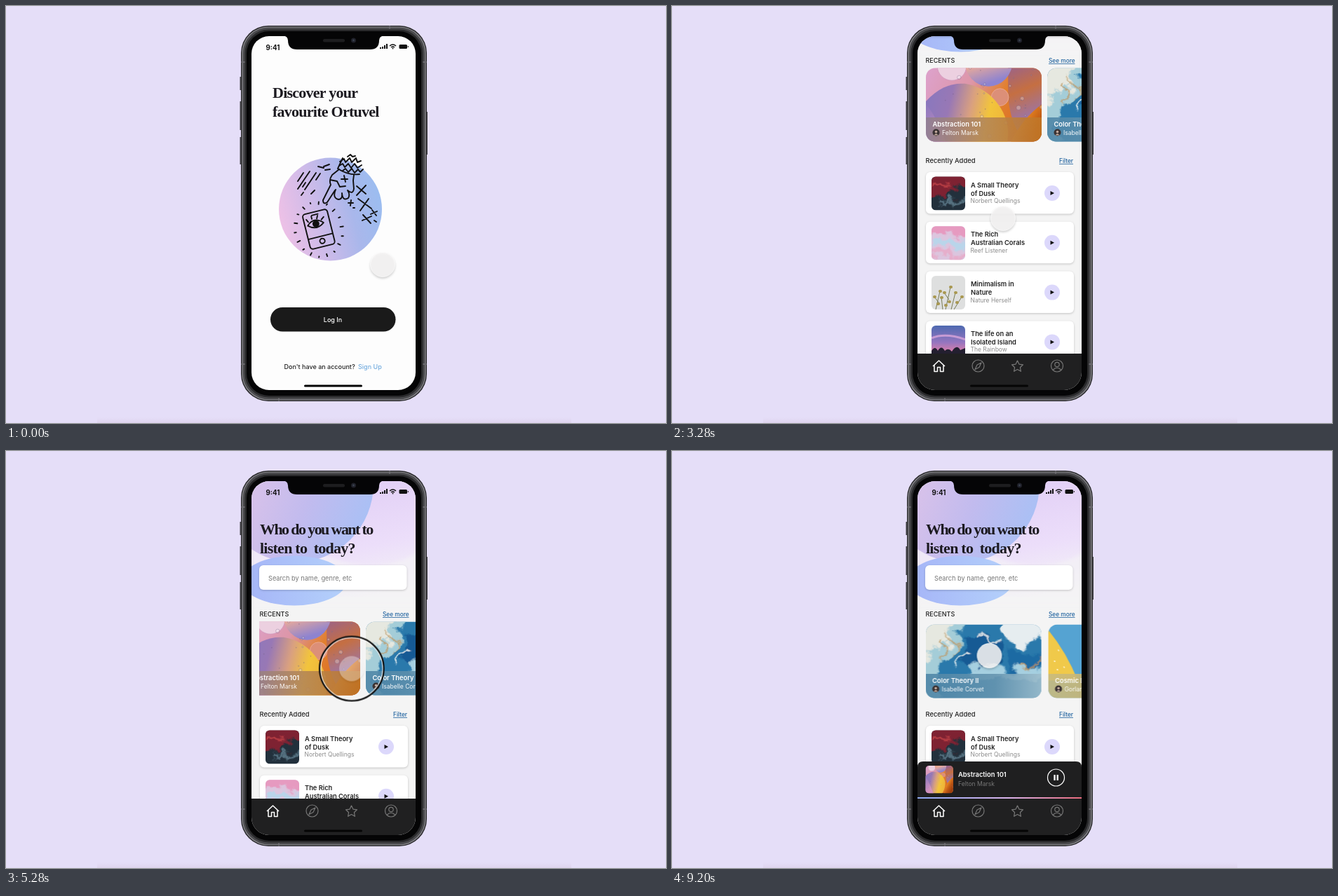
Write an HTML page that moves like this. It is 941 px wide and 595 px high and loops after 9.28 s.

```html
<!DOCTYPE html>
<html lang="en">
<head>
<meta charset="utf-8">
<title>Audio app preview</title>
<style>
html, body { margin: 0; width: 100%; height: 100%; overflow: hidden; background: #e5def8; }
svg.stage { display: block; width: 100vw; height: 100vh; }
text { font-family: Inter, sans-serif; font-size: 9px; font-weight: 500; fill: #222; }
.head { font: bold 22px "Liberation Serif", serif; letter-spacing: -.75px; fill: #1c1a20; white-space: pre; }
.tight { letter-spacing: -1.6px; }
.bold { font-weight: 600; font-size: 9.3px; }
.dim { font-weight: 400; font-size: 8.5px; fill: #8c8c8c; }
.link { font-size: 8.3px; fill: #20639f; }
.tiny { font-size: 7px; }
.white { fill: #fff; }
.line { fill: none; stroke: #111; stroke-width: 1.9; stroke-linecap: round; stroke-linejoin: round; }
.icon { fill: none; stroke: #777; stroke-width: 1.2; stroke-linejoin: round; }
.lift { filter: drop-shadow(0 1px 1.5px #0003); }

.move { animation: 9.28s ease-in-out infinite both; }
#home { animation-name: home; }
#player { animation-name: player; }
#scroll { animation-name: scroll; }
#cards { animation-name: cards; }
.late { animation-name: late; animation-timing-function: step-end; }
#shift { animation-name: shift; animation-timing-function: step-end; }
#cursor { animation-name: cursor; }
#disc { animation-name: disc; animation-timing-function: linear; }
#ring { animation-name: ring; animation-timing-function: ease-out; }

@keyframes home { 0%, 6.9% { opacity: 0 } 10.34%, 100% { opacity: 1 } }
@keyframes player { 0%, 64.66% { opacity: 0 } 68.1%, 81.9% { opacity: 1 } 84.48%, 100% { opacity: 0 } }
@keyframes late { 0% { opacity: 0 } 73.28%, 100% { opacity: 1 } }
@keyframes shift { 0% { transform: none } 73.28%, 100% { transform: translateY(4px) } }
@keyframes scroll {
  0%, 22.41% { transform: translateY(0) }
  27.59%, 37.07% { transform: translateY(-155px) }
  42.24%, 100% { transform: translateY(0) }
}
@keyframes cards {
  0%, 45.69% { transform: translateX(0); animation-timing-function: ease-in }
  49.138% { transform: translateX(-100px); animation-timing-function: ease-out }
  51.72%, 54.31% { transform: translateX(-173px) }
  56.897% { transform: translateX(-22.5px); animation-timing-function: ease-out }
  57.76%, 88.79% { transform: translateX(0) }
  93.1%, 100% { transform: translateX(-173.5px) }
}
@keyframes cursor {
  0%, .86% { transform: translate(537px, 369px) }
  4.31%, 22.41% { transform: translate(478px, 448px) }
  27.59%, 37.07% { transform: translate(472px, 303px) }
  42.24% { transform: translate(474px, 440px) }
  45.69% { transform: translate(535px, 305px); animation-timing-function: ease-in }
  49.138% { transform: translate(435px, 307px); animation-timing-function: ease-out }
  51.72%, 54.31% { transform: translate(385px, 308px) }
  56.897% { transform: translate(492.5px, 310.5px); animation-timing-function: ease-out }
  57.76% { transform: translate(508px, 311px) }
  62.07%, 73.28% { transform: translate(435.5px, 308px) }
  79.31%, 82% { transform: translate(371px, 95px) }
  87.93%, 88.79% { transform: translate(535px, 296px) }
  93.1%, 100% { transform: translate(452.5px, 292px) }
}
@keyframes ring {
  0%, 4.31%, 7.76%, 22%, 28.4%, 36.7%, 43.1%, 44.83%, 58.6%, 62.07%, 65.5%, 79.31%, 82.7%, 88.4%, 94%, 100% { opacity: 0; transform: scale(.4) }
  5.17%, 6.9%, 22.8%, 27.59%, 37.5%, 42.24%, 45.69%, 57.76%, 62.93%, 64.66%, 80.17%, 81.9%, 89.2%, 93.1% { opacity: 1; transform: scale(1) }
}
@keyframes disc {
  0%, 4.31%, 7.76%, 22%, 28.4%, 36.7%, 43.1%, 44.83%, 58.6%, 62.07%, 65.5%, 79.31%, 82.7%, 88.4%, 94%, 100% { opacity: 1 }
  5.17%, 6.9%, 22.8%, 27.59%, 37.5%, 42.24%, 45.69%, 57.76%, 62.93%, 64.66%, 80.17%, 81.9%, 89.2%, 93.1% { opacity: .42 }
}
</style>
</head>
<body>
<svg class="stage" viewBox="0 0 941 595">
<defs>
  <linearGradient id="floor" x2="0" y2="1"><stop stop-color="#e5def8"/><stop offset="1" stop-color="#dcd0e9"/></linearGradient>
  <linearGradient id="orb" x1="0" y1=".65" x2="1" y2=".4"><stop stop-color="#efc1e6"/><stop offset=".35" stop-color="#cfbbe9"/><stop offset=".7" stop-color="#a9b7eb"/><stop offset="1" stop-color="#9bbdf0"/></linearGradient>
  <linearGradient id="sky" x1=".4" y1="0" x2=".7" y2="1"><stop stop-color="#e0cdf5"/><stop offset=".6" stop-color="#ecdefa"/><stop offset="1" stop-color="#f4f3f5"/></linearGradient>
  <linearGradient id="moon" x1=".3" y1=".4" x2="1" y2=".65"><stop stop-color="#d6c1ea"/><stop offset=".45" stop-color="#c2bbee"/><stop offset="1" stop-color="#a9c0f5"/></linearGradient>
  <linearGradient id="pool"><stop stop-color="#a5b4f7"/><stop offset="1" stop-color="#b4d1fb"/></linearGradient>
  <linearGradient id="base" x2="1" y2=".5"><stop stop-color="#dda3d0"/><stop offset=".4" stop-color="#dd96a8"/><stop offset=".65" stop-color="#e18030"/><stop offset="1" stop-color="#d9661c"/></linearGradient>
  <linearGradient id="drop" x1="0" y1=".35" x2="1" y2=".6"><stop stop-color="#8b78bd"/><stop offset=".25" stop-color="#9878b5"/><stop offset=".5" stop-color="#d9a080"/><stop offset=".72" stop-color="#f2c43c"/><stop offset="1" stop-color="#eeb238"/></linearGradient>
  <linearGradient id="glow" x2=".4" y2="1"><stop stop-color="#d99bd0" stop-opacity="0"/><stop offset="1" stop-color="#d793bd"/></linearGradient>
  <linearGradient id="bubble" x2=".3" y2="1"><stop stop-color="#e08a3a"/><stop offset=".6" stop-color="#e5a89c"/><stop offset="1" stop-color="#8d83d0"/></linearGradient>
  <linearGradient id="wedge" x2=".2" y2="1"><stop stop-color="#8f5f9c"/><stop offset=".5" stop-color="#c56f42"/><stop offset="1" stop-color="#9276bd"/></linearGradient>
  <linearGradient id="ember" x1="0" y1="0" x2=".8" y2=".8"><stop stop-color="#f3a52c"/><stop offset=".45" stop-color="#ea8a22"/><stop offset=".75" stop-color="#bd5614"/><stop offset="1" stop-color="#9c3f0e"/></linearGradient>
  <linearGradient id="warm"><stop stop-color="#917f93"/><stop offset=".5" stop-color="#b48757"/><stop offset="1" stop-color="#c27624"/></linearGradient>
  <linearGradient id="cool"><stop stop-color="#4f86a7"/><stop offset=".6" stop-color="#6695b0"/><stop offset="1" stop-color="#a0bfcd"/></linearGradient>
  <linearGradient id="sand"><stop stop-color="#c8bb80"/><stop offset="1" stop-color="#cfae5e"/></linearGradient>
  <linearGradient id="progress"><stop stop-color="#8ea9f5"/><stop offset=".55" stop-color="#d9b4ec"/><stop offset="1" stop-color="#e86a7c"/></linearGradient>
  <linearGradient id="dusk" x2="0" y2="1"><stop stop-color="#4d69b0"/><stop offset=".5" stop-color="#9575bf"/><stop offset=".8" stop-color="#e07fa8"/></linearGradient>
  <filter id="soft"><feGaussianBlur stdDeviation="2.5"/></filter>
  <filter id="marble" x="-.2" y="-.2" width="1.4" height="1.4">
    <feTurbulence type="fractalNoise" baseFrequency=".045" numOctaves="4" seed="5" result="noise"/>
    <feGaussianBlur in="SourceGraphic" stdDeviation=".8"/>
    <feDisplacementMap in2="noise" scale="34" xChannelSelector="R" yChannelSelector="G"/>
  </filter>
  <clipPath id="screen"><rect x="350" y="43" width="234" height="505" rx="25"/></clipPath>
  <clipPath id="lane"><rect x="361.5" y="240" width="230" height="120"/></clipPath>
  <clipPath id="cardClip"><rect width="165" height="105" rx="13"/></clipPath>
  <clipPath id="artClip"><rect width="214" height="212" rx="12"/></clipPath>
  <clipPath id="thumbClip"><rect width="48" height="48" rx="6"/></clipPath>

  <g id="bubbles">
    <rect width="214" height="212" fill="url(#base)"/>
    <path d="M152 0H214V90L170 135Q155 110 152 70Z" fill="url(#wedge)"/>
    <circle cx="48" cy="14" r="27" fill="#ecd0e0" stroke="#cf92bb"/>
    <ellipse cx="116" cy="6" rx="44" ry="46" fill="url(#bubble)"/>
    <circle cx="137" cy="72" r="16" fill="#dc8f78" stroke="#eeb09a"/>
    <path d="M-2 82C22 54 48 45 72 47C118 53 153 98 152 140C151 172 138 197 128 214H-2Z" fill="url(#drop)"/>
    <path d="M-2 82C30 120 40 170 62 214H-2Z" fill="url(#glow)"/>
    <path d="M216 84C178 110 146 160 140 214H216Z" fill="url(#ember)"/>
    <g id="drops" fill="#fff4" stroke="#5a4a7288" stroke-width=".7"/>
  </g>
  <g id="ocean">
    <rect width="165" height="105" fill="#2a79ab"/>
    <g filter="url(#marble)">
      <path d="M-20-20H66Q44 18 46 36Q24 50 14 72V110H-20Z" fill="#a4cdd8"/>
      <path d="M-20-20H52Q36 14 34 26Q14 30 6 46H-20Z" fill="#e6e8e0"/>
      <path d="M54 22Q80 6 106 24Q118 48 92 66Q60 72 54 48Z" fill="#125a94"/>
      <path d="M104-20H190V24Q148 14 132 32Q112 22 104-20Z" fill="#e6edf0"/>
      <path d="M66 62Q86 50 104 60T150 56L170 76H60Z" fill="#a5cfe0"/>
      <path d="M118 38Q140 36 170 52V62H122Z" fill="#1f6ba3"/>
      <path d="M30 14Q46 22 40 40M140 66L164 50M20 20L26 50" fill="none" stroke="#bd9650" stroke-width="2.5"/>
      <path d="M78 16Q90 24 104 20M46 56L62 44" fill="none" stroke="#e6eef0" stroke-width="3"/>
    </g>
  </g>
  <g id="canary">
    <rect width="165" height="105" fill="#55a3d2"/>
    <path d="M0 8Q26 40 42 80H0Z" fill="#f0c94a"/>
    <path d="M14 36l1 2M8 52l2 1M22 60l1 2M12 64l2 1" stroke="#fff8d8" stroke-width="1.6"/>
  </g>
  <g id="lava">
    <rect width="48" height="48" fill="#22303c"/>
    <g filter="url(#marble)"><path d="M-16-16H64V20Q34 8 24 24T-16 28Z" fill="#7e2430"/><path d="M4 10Q20 2 30 14" stroke="#b83c44" stroke-width="4" fill="none"/><path d="M10 44Q28 24 46 34" stroke="#587584" stroke-width="4" fill="none"/></g>
  </g>
  <g id="coral">
    <rect width="48" height="48" fill="#dcc5de"/>
    <g filter="url(#marble)"><path d="M-10 10Q20 0 36 12T60 6V-16H-10Z" fill="#e69ac0"/><path d="M4 30Q22 14 44 28" stroke="#b9d5ea" stroke-width="11" fill="none"/><path d="M0 44Q22 32 48 46" stroke="#e6aecb" stroke-width="7" fill="none"/></g>
  </g>
  <g id="meadow">
    <rect width="48" height="48" fill="#dedfdf"/>
    <path d="M6 48L12 22M16 48L14 30M20 48L27 16M28 48L34 24M32 48L43 30M12 40L4 30M25 34L18 24" stroke="#777b55" fill="none"/>
    <path d="M12 22h1M4 30h1M27 16h1M18 24h1M34 24h1M43 30h1M14 31h1M25 37h1M36 38h1M9 40h1M20 42h1" stroke="#a99850" stroke-width="4" stroke-linecap="round"/>
  </g>
  <g id="island">
    <rect width="48" height="48" fill="url(#dusk)"/><path d="M0 18Q20 10 48 20" stroke="#c79bd4" stroke-width="3" fill="none"/>
    <path d="M0 48V36Q5 28 9 36Q14 27 19 36Q24 31 29 37Q36 26 41 35L48 32V48Z" fill="#231f30"/>
  </g>
  <g id="face"><circle r="5" fill="#3b3334"/><circle cy="-1" r="1.8" fill="#c0a79a"/><path d="M-3 4Q0-1 3 4Z" fill="#c0a79a"/></g>
  <path id="star" d="M0-8l2.4 5.1 5.6.7-4.1 3.9 1 5.6-4.9-2.8-4.9 2.8 1-5.6L-8-2.2l5.6-.7z"/>
  <g id="status">
    <text x="370.5" y="62.5" style="font-size:9.7px;font-weight:700;fill:#111">9:41</text>
    <path d="M534 61v-2M537 61v-3M540 61v-5M543 61v-7" stroke="#111" stroke-width="2"/>
    <path d="M547 57Q551.5 53 556 57M549 59Q551.5 57 554 59" fill="none" stroke="#111" stroke-width="1.5"/><circle cx="551.5" cy="60.5" r="1" fill="#111"/>
    <rect x="560.5" y="55" width="11.5" height="6" rx="1.5" fill="#111"/><path d="M573.3 57v2" stroke="#111"/>
  </g>
  <rect id="bar" x="425" y="540.5" width="83" height="3" rx="1.5" fill="#050505"/>
</defs>

<rect width="941" height="595" fill="#e5def8"/>
<rect x="130" y="587" width="676" height="8" fill="url(#floor)" opacity=".7"/>

<path d="M334.5 101v19M334.5 136v41M334.5 187v39M600 151v61" stroke="#434247" stroke-width="2"/>
<rect x="335" y="28" width="265" height="536" rx="39" fill="#29292b"/>
<rect x="338.5" y="31.500" width="258" height="529" rx="36" fill="none" stroke="#4a4a4d" stroke-width="4"/>
<rect x="337" y="30" width="261" height="532" rx="37.500" fill="none" stroke="#8a898e" stroke-width="1.200"/>
<path d="M335.500 80h5M594.500 80h5M335.500 511h5M594.500 511h5M547 28.500v4M389 559.500v4" stroke="#6c6b70" stroke-width="2"/>
<rect x="343" y="36" width="249" height="520" rx="32" fill="#050506"/>

<g clip-path="url(#screen)">
  <g class="login">
    <rect x="350" y="43" width="234" height="505" fill="#fdfdfd"/>
    <use href="#status"/>
    <text class="head" x="380" y="131">Discover your</text><text class="head" x="380" y="158">favourite Ortuvel</text>
    <circle cx="462.5" cy="290" r="73.5" fill="url(#orb)"/>
    <g class="line">
      <path d="M480 217L473 232Q488 242 504 240M476 222l6-4 2 5 6-6 3 6 6-6 2 6 5-2M475 228l5-3 3 5 5-5 4 6 5-6 4 6 6-4M487 215l4-3 3 3 4-1M480 235l4-3 4 5 5-5 4 6 5-5 3 4 4-4"/>
      <path d="M475 233L465 241Q460 248 463 255L452 277Q452 284 458 280L469 263M496 241l-1 8 1 12M462 248l10 2 4 8 8-1M470 262Q465 274 474 276Q480 276 479 267Q480 279 488 274Q491 269 487 263Q495 270 496 260M478 247h9M482 242l2 9"/>
      <path d="M433 236l-17 25M442 238l-16 24M424 238l-8 12M448 239l-6 9M445 229l8 2M453 229l8-3M455 234l7-1M424 266l-3 4M440 263l-5 5M427 252l-4 6"/>
      <path d="M500 257l13 11M513 256l-13 14M502 275l19 14M517 275l-12 17M509 298l11 12M521 300l-13 6M522 291l6 8M529 293l-9 4M488 281h7M492 277l-1 8M525 306l3 2M495 288h2"/>
      <g transform="translate(446 319) rotate(-14)">
        <rect x="-18" y="-26" width="36" height="51" rx="4"/><path d="M-17 10H17M-5-22H4M-14-9Q-3-20 9-8Q-3 1-14-9M-12-14l-2-4M-6-17v-4M1-16l2-4M7-13l4-3"/>
        <circle cx="-2" cy="-9" r="4" fill="#111"/><circle cx="1" cy="17" r="3.6"/><g id="rays"/>
      </g>
    </g>
    <rect x="377" y="430" width="178.5" height="34.5" rx="17.2" fill="#1a1a1a"/>
    <text class="white" x="466" y="450.5" text-anchor="middle">Log In</text>
    <text x="396.5" y="518">Don't have an account?</text><text x="502" y="518" style="fill:#73acdf">Sign Up</text>
    <use href="#bar"/>
  </g>

  <g id="home" class="move">
    <rect x="350" y="43" width="234" height="505" fill="#f4f4f4"/>
    <g id="scroll" class="move">
      <rect x="350" y="43" width="234" height="165" fill="url(#sky)"/>
      <path d="M350 140H440Q520 186 590 143V222H350Z" fill="#f4f3f6" opacity=".6" filter="url(#soft)"/>
      <circle cx="412" cy="47" r="112" fill="url(#moon)"/>
      <ellipse cx="411" cy="185" rx="75" ry="35.5" fill="url(#pool)"/>
      <use href="#status"/>
      <text class="head tight" x="362" y="119">Who do you want to</text><text class="head" x="362" y="146">listen to  today?</text>
      <rect class="lift" x="361" y="163" width="210.5" height="35" rx="6" fill="#fff"/>
      <text class="dim" x="374" y="184.5" style="font-size:9.2px;fill:#777">Search by name, genre, etc</text>
      <text x="361.5" y="235.5">RECENTS</text><text class="link" x="537" y="235.5">See more</text>
      <path d="M537 237.5h37.5M552 380.5h20" stroke="#20639f" stroke-width=".8"/>
      <g id="shift" class="move"><g clip-path="url(#lane)"><g id="cards" class="move"></g></g></g>
      <text x="361.5" y="378.5" style="font-size:9.4px">Recently Added</text><text class="link" x="552" y="378.5">Filter</text>
      <g id="list"></g>
    </g>
    <g class="move late">
      <path d="M350 498V451Q350 443 358 443H576Q584 443 584 451V498Z" fill="#1f1f20"/>
      <g transform="translate(361.5 449) scale(.82)" clip-path="url(#thumbClip)"><use href="#bubbles" transform="scale(.226)"/></g>
      <text class="bold white" x="408" y="465">Abstraction 101</text><text class="dim" x="408" y="478" style="fill:#777">Felton Marsk</text>
      <circle cx="547.5" cy="466" r="12" fill="none" stroke="#fff" stroke-width="1.2"/><path d="M545.5 462v8M549.7 462v8" stroke="#fff" stroke-width="2.3"/>
    </g>
    <rect x="350" y="496" width="234" height="52" fill="#202021"/>
    <rect class="move late" x="350" y="494" width="234" height="2" fill="url(#progress)"/>
    <g class="icon">
      <path d="M372 514l8.5-8 8.5 8M374 512.5v9h4.5v-6h4v6h4.5v-9" stroke="#fff" stroke-width="1.5"/>
      <circle cx="436.5" cy="513.5" r="8.5"/><path d="M441 509l-3 6.5-6 3 3-6.5z"/>
      <use href="#star" x="492.5" y="514"/>
      <circle cx="549" cy="513.5" r="8.5"/><circle cx="549" cy="511.5" r="3.2"/><path d="M543 519.5Q549 513 555 519.5"/>
    </g>
    <use href="#bar"/>
  </g>

  <g id="player" class="move">
    <rect x="350" y="43" width="234" height="505" fill="#fdfdfd"/>
    <use href="#status"/>
    <path d="M378 94.5H364M370 88l-6.5 6.5 6.5 6.5" fill="none" stroke="#777" stroke-width="1.6"/>
    <path d="M560.5 88h.01M560.5 94.5h.01M560.5 101h.01" stroke="#777" stroke-width="3.2" stroke-linecap="round"/>
    <g transform="translate(361 140)" clip-path="url(#artClip)"><use href="#bubbles"/></g>
    <text x="467" y="395" text-anchor="middle" style="font-size:14.2px;font-weight:600">Abstraction 101</text>
    <text class="dim" x="467" y="414" text-anchor="middle">Felton Marsk</text>
    <text class="dim tiny" x="372" y="451.5">7.07</text><text class="dim tiny" x="544" y="451.5">32.0</text>
    <path d="M393 449H537" stroke="#d6d6d6" stroke-width="3"/><path d="M393 449H435" stroke="#1a1a1a" stroke-width="3"/><circle cx="435" cy="449" r="4" fill="#1a1a1a"/>
    <use href="#star" class="icon" transform="translate(379 501) scale(.85)"/>
    <path d="M418 495v12M429 495v12l-9-6zM517 495v12M506 495v12l9-6z" fill="#aaa" stroke="#999"/>
    <path class="icon" d="M544 498h4l6-4v13l-6-4h-4zM556.5 497l2-1M557 501h2.5M556.5 505l2 1"/>
    <circle cx="467" cy="500.5" r="19.3" fill="#1a1a1b"/><path d="M463.5 494v13M470.3 494v13" stroke="#fff" stroke-width="4"/>
    <use href="#bar"/>
  </g>
</g>

<path d="M394 42Q402 43 402 49Q402 62 415 62H519Q532 62 532 49Q532 43 540 42Z" fill="#050506"/>
<rect x="452" y="47" width="31" height="4.5" rx="2" fill="#1d1d1f"/><circle cx="495.5" cy="49" r="3.5" fill="#20212a"/><circle cx="495.5" cy="49" r="1.4" fill="#39424f"/>

<g id="cursor" class="move">
  <g id="ring" class="move" fill="none"><circle r="44.3" stroke="#fffc" stroke-width="1.5"/><circle r="45.8" stroke="#111" stroke-width="2.2"/></g>
  <g id="disc" class="move"><circle r="17.5" fill="#f5f4f4e0" stroke="#fff9" style="filter:drop-shadow(0 2px 1.5px #0003)"/></g>
</g>
</svg>
<script>
const fill = (id, parts) => { document.getElementById(id).innerHTML = parts.join(''); };
const range = (n, fn) => Array.from({ length: n }, (_, i) => fn(i));

let seed = 11;
const rand = () => (seed = (seed * 16807) % 2147483647) / 2147483647;

fill('drops', range(70, () => {
  const r = .6 + 3.6 * rand() ** 4;
  return `<circle cx="${rand() * 214}" cy="${rand() * 212}" r="${r}"/>`;
}));

fill('rays', range(18, i => {
  const a = i * Math.PI / 9 + .1, x = Math.cos(a), y = Math.sin(a);
  const k = i % 2 ? 1.25 : 1.18;
  return `<path d="M${x * 26 * k} ${y * 31 * k}L${x * 35} ${y * 40}"/>`;
}));

const cards = [
  { x: 362, art: 'bubbles', fit: 'scale(.771) translate(0 -18)', tint: 'warm', title: 'Abstraction 101', by: 'Felton Marsk' },
  { x: 535, art: 'ocean', fit: '', tint: 'cool', title: 'Color Theory II', by: 'Isabelle Corvet' },
  { x: 710, art: 'canary', fit: '', tint: 'sand', title: 'Cosmic Drift', by: 'Gorlan Wick' }
];
fill('cards', cards.map(c => `
  <g transform="translate(${c.x} 243.5)" clip-path="url(#cardClip)">
    <use href="#${c.art}" transform="${c.fit}"/>
    <rect y="70.5" width="165" height="35" fill="url(#${c.tint})" opacity=".9"/>
    <text class="bold white" x="9.5" y="83.5">${c.title}</text>
    <use href="#face" x="14.5" y="92"/>
    <text class="dim" x="23" y="95" style="fill:#fffe">${c.by}</text>
  </g>`));

const shows = [
  ['lava', 'A Small Theory', 'of Dusk', 'Norbert Quellings'],
  ['coral', 'The Rich', 'Australian Corals', 'Reef Listener'],
  ['meadow', 'Minimalism in', 'Nature', 'Nature Herself'],
  ['island', 'The life on an', 'Isolated Island', 'The Rainbow']
];
fill('list', shows.map(([art, first, second, by], i) => `
  <g transform="translate(0 ${i * 70.8})">
    <rect class="lift" x="362" y="392" width="211" height="59.5" rx="6" fill="#fff"/>
    <g transform="translate(370 398.5)" clip-path="url(#thumbClip)"><use href="#${art}"/></g>
    <text class="bold" x="426" y="413.5">${first}</text><text class="bold" x="426" y="425.5">${second}</text>
    <text class="dim" x="425.5" y="436">${by}</text>
    <circle cx="542" cy="422" r="11" fill="#dcd8fb"/><path d="M539.5 419l5.5 3-5.5 3z" fill="#111"/>
  </g>`));
</script>
</body>
</html>
```
